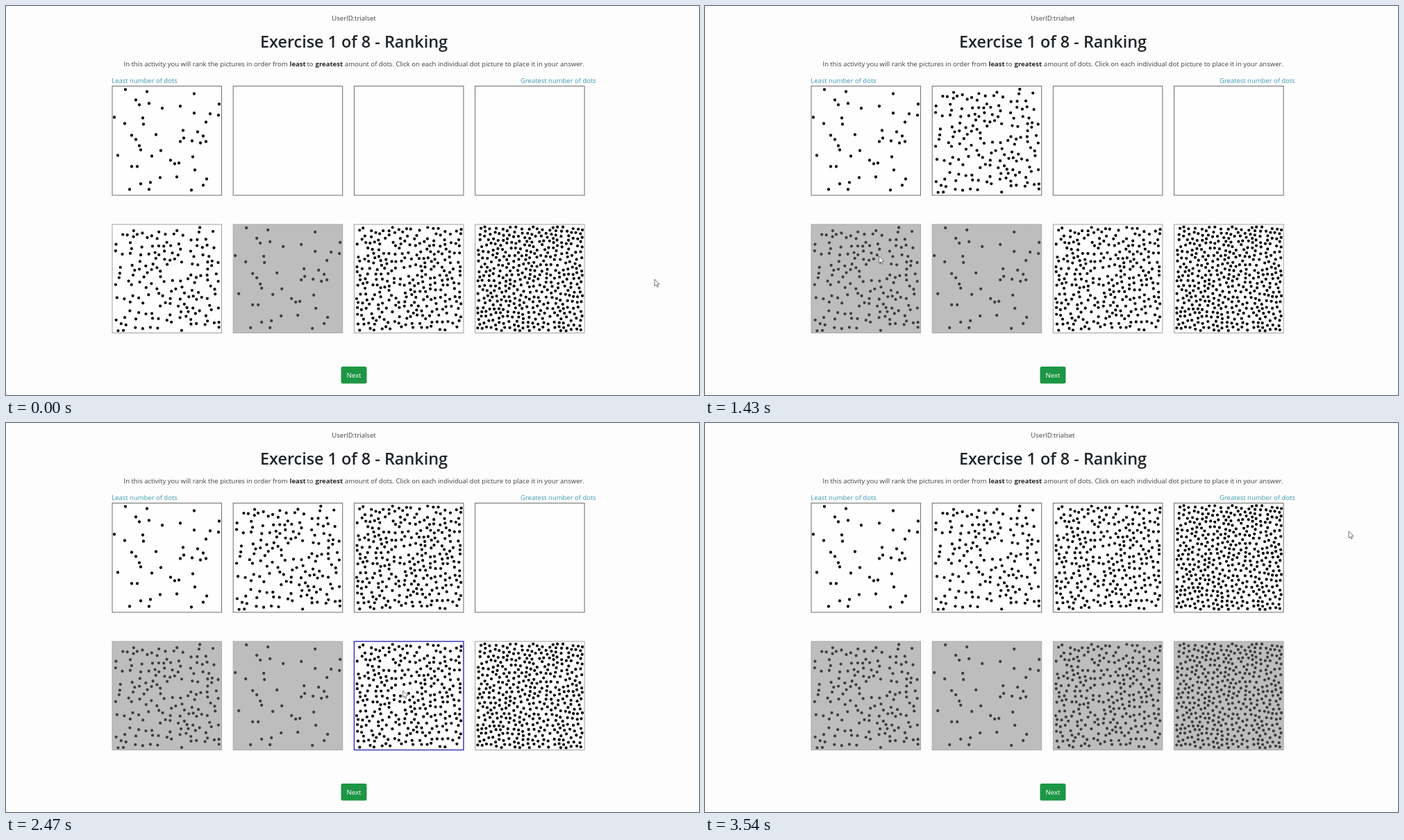
An HTML page with a canvas for the animation above (3.58 s loop, 998x561 px).

```html
<!DOCTYPE html>
<html lang="en">
<head>
<meta charset="utf-8">
<title>Ranking exercise</title>
<style>
  html, body { margin: 0; width: 100%; height: 100%; overflow: hidden; background: #fdfdfd; }
  canvas { display: block; }
</style>
</head>
<body>
<canvas id="stage" width="998" height="561"></canvas>
<script>
const ctx = document.getElementById("stage").getContext("2d");
const LOOP = 3580, SIZE = 157.5, TOP = 115.5, BOTTOM = 315;
const DOT = 2.15;
const panelX = i => 153 + i * 174.2;

// Dot pictures, from fewest to most
const sparse = [
  19,5, 50,8, 34,20, 39,27, 53,25, 72,32, 98,29, 118,11, 154,26, 153,42,
  141,40, 118,39, 135,52, 3,45, 44,46, 45,55, 18,54, 28,71, 34,77, 39,86,
  41,92, 63,70, 70,93, 57,101, 8,100, 28,116, 36,116, 84,107, 90,112, 96,111,
  98,80, 103,75, 102,64, 115,79, 123,66, 131,72, 127,82, 135,80, 116,102,
  119,121, 136,134, 131,143, 114,150, 93,131, 69,132, 55,139, 53,149, 41,141, 25,149
];

function random(seed) {
  return () => {
    seed = (seed * 1664525 + 1013904223) % 4294967296;
    return seed / 4294967296;
  };
}

// Scatter with a minimum gap; the first dots gather in the clusters
function scatter(count, gap, seed, clusters = []) {
  const rnd = random(seed), points = [];
  for (let tries = 0; points.length / 2 < count && tries < 60000; tries++) {
    let x = 3.5 + rnd() * 151, y = 3.5 + rnd() * 150;
    if (clusters.length && points.length / 2 < count * 0.25) {
      const [cx, cy, r] = clusters[tries % clusters.length];
      x = cx + (rnd() * 2 - 1) * r;
      y = cy + (rnd() * 2 - 1) * r;
    }
    let free = true;
    for (let i = 0; free && i < points.length; i += 2) {
      free = Math.hypot(points[i] - x, points[i + 1] - y) >= gap;
    }
    if (free) points.push(x, y);
  }
  return points;
}

function dotPath(points) {
  const path = new Path2D();
  for (let i = 0; i < points.length; i += 2) {
    path.moveTo(points[i] + DOT, points[i + 1]);
    path.arc(points[i], points[i + 1], DOT, 0, Math.PI * 2);
  }
  return path;
}

const pictures = [
  sparse,
  scatter(168, 6, 41, [[118, 122, 24], [82, 32, 26]]),
  scatter(295, 5.8, 17),
  scatter(425, 5.8, 93)
].map(dotPath);

// Choices in the bottom row: picture, time placed, time greyed out
const choices = [
  { picture: 1, placed: 565, grey: 690 },
  { picture: 0, placed: 0, grey: 0 },
  { picture: 2, placed: 2420, grey: 2540 },
  { picture: 3, placed: 2660, grey: 2880 }
];

// Pointer stops: time, x, y
const stops = [
  [0, 934, 394], [130, 986, 392], [450, 225, 383], [560, 212, 377], [635, 212, 377],
  [940, 986, 305], [1130, 892, 292], [1560, 74, 380], [1740, 683, 396],
  [1840, 849, 392], [2100, 167, 373], [2340, 560, 386], [2450, 565, 386],
  [2610, 706, 386], [2710, 706, 386], [2900, 838, 345], [3200, 842, 290],
  [3540, 927, 156], [3580, 927, 156]
];

function pointerAt(t) {
  const i = Math.max(1, stops.findIndex(s => s[0] > t));
  const [t0, x0, y0] = stops[i - 1], [t1, x1, y1] = stops[i];
  const u = (t - t0) / (t1 - t0), k = u * u * (3 - 2 * u);
  return [x0 + (x1 - x0) * k, y0 + (y1 - y0) * k];
}

function text(str, x, y, size, color, weight = 400, align = "left") {
  ctx.font = `${weight} ${size}px "Open Sans", "Noto Sans", sans-serif`;
  ctx.textAlign = align;
  ctx.fillStyle = color;
  ctx.fillText(str, x, y);
}

function panel(x, y, picture, fill, ink, border, lineWidth = 1) {
  ctx.save();
  ctx.translate(x, y);
  ctx.fillStyle = fill;
  ctx.fillRect(0, 0, SIZE, SIZE - (y === BOTTOM ? 1 : 0));
  ctx.beginPath();
  ctx.rect(0, 0, SIZE, SIZE);
  ctx.clip();
  if (picture) {
    ctx.fillStyle = ink;
    ctx.fill(picture);
  }
  ctx.restore();
  ctx.strokeStyle = border;
  ctx.lineWidth = lineWidth;
  ctx.strokeRect(x, y, SIZE, SIZE - (y === BOTTOM ? 1 : 0));
}

function drawPage() {
  const ink = "#3b3f43";
  ctx.fillStyle = "#fdfdfd";
  ctx.fillRect(0, 0, 998, 561);
  text("UserID:trialset", 501, 21, 9.5, ink, 400, "center");
  text("Exercise 1 of 8 - Ranking", 501, 60, 23.4, "#212529", 600, "center");
  text("In this activity you will rank the pictures in order from", 169.5, 86.5, 9.55, ink);
  text("least", 408.5, 86.5, 9.55, "#212529", 700);
  text("to", 433.5, 86.5, 9.55, ink);
  text("greatest", 445.5, 86.5, 9.55, "#212529", 700);
  text("amount of dots. Click on each individual dot picture to place it in your answer.",
    833, 86.5, 9.55, ink, 400, "right");
  text("Least number of dots", 152.3, 111.3, 9.47, "#3a98ae");
  text("Greatest number of dots", 741, 111.3, 9.47, "#3a98ae");
  ctx.fillStyle = "#1d9645";
  ctx.beginPath();
  ctx.roundRect(482.5, 520, 37, 24.5, 2.5);
  ctx.fill();
  text("Next", 501, 536, 9.6, "#fff", 500, "center");
}

function drawPointer(x, y) {
  const outline = [[0, 0], [0, 10], [2.3, 8], [3.8, 11.4], [5.3, 10.7], [3.9, 7.4], [7, 7.1]];
  ctx.beginPath();
  outline.forEach(([dx, dy]) => ctx.lineTo(x + dx, y + dy));
  ctx.closePath();
  ctx.fillStyle = "#fff";
  ctx.fill();
  ctx.strokeStyle = "#555";
  ctx.lineWidth = 0.8;
  ctx.stroke();
}

function draw(t) {
  const [px, py] = pointerAt(t);
  drawPage();
  choices.forEach((choice, i) => {
    const slot = choice.picture, image = pictures[slot];
    panel(panelX(slot), TOP, t >= choice.placed ? image : null, "#fefefe", "#080808", "#6c6c6c");

    const x = panelX(i), grey = t >= choice.grey;
    const hover = !grey && px > x + 10 && px < x + SIZE && py > BOTTOM && py < BOTTOM + SIZE;
    if (grey) panel(x, BOTTOM, image, "#bdbdbd", "#3e3e3e", "#a9a9a4");
    else panel(x, BOTTOM, image, "#fefefe", "#080808", hover ? "#3030b4" : "#a0a0a0", hover ? 1.4 : 1);
  });
  drawPointer(px, py);
}

const start = performance.now();
function tick() {
  draw((performance.now() - start) % LOOP);
  requestAnimationFrame(tick);
}
tick();
</script>
</body>
</html>
```
